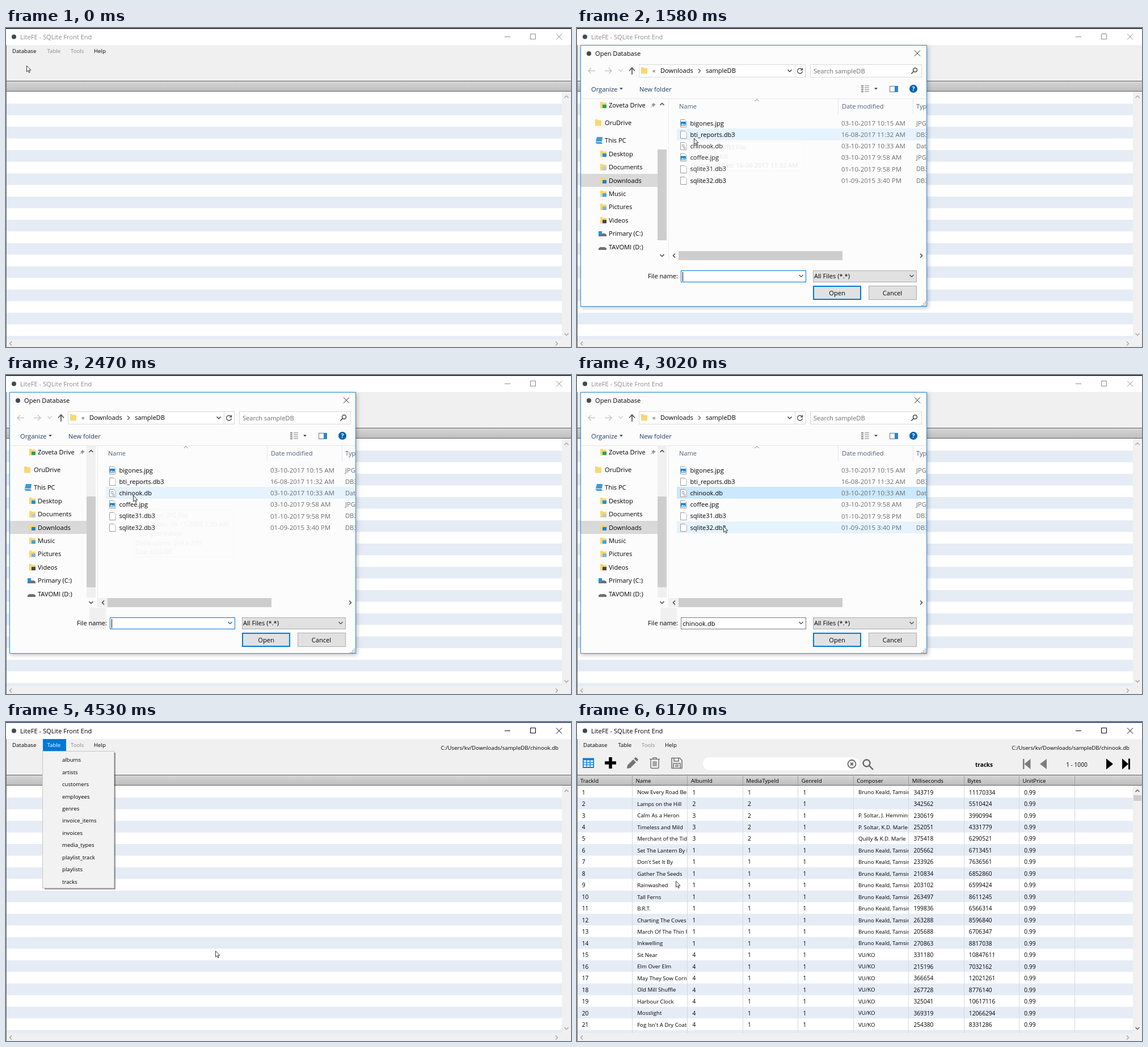
An HTML page with a canvas that plays this animation: 996 by 562 pixels, repeating every 8000 ms.

```html
<!DOCTYPE html>
<html lang="en">
<head>
<meta charset="utf-8">
<title>SQLite front end demo</title>
<style>
html, body { margin: 0; width: 100%; height: 100%; overflow: hidden; background: #fff; }
canvas { display: block; }
</style>
</head>
<body>
<canvas id="stage" width="996" height="562"></canvas>
<script>
const ctx = document.getElementById('stage').getContext('2d');
const LOOP = 8000, APP = 9.65, DLG = 11.1, NUM = 10.2, DATE = 11.5;
const BLUE = '#0078d7', GRAY = '#8a8a8a', THUMB = '#cdcdcd', FACE = '#f0f0f0';
const ROW = 20.47, COLUMN = 97.45;

// time, x, y of the pointer tip
const POINTER = [
  [0, 36, 66], [880, 60, 76], [1010, 97, 87], [1150, 173, 109], [1310, 151, 129], [1430, 186, 170],
  [1580, 206, 194], [1850, 220, 214], [1970, 225, 219], [2470, 224, 212], [2740, 238, 228],
  [2870, 250, 250], [3020, 258, 266], [3140, 286, 292], [3290, 380, 400], [3420, 436, 469],
  [3570, 437, 471], [4260, 438, 472], [4400, 404, 437], [4530, 369, 403], [4680, 316, 371],
  [4830, 278, 348], [4970, 232, 318], [5120, 197, 296], [5240, 177, 281], [5390, 174, 280]
];
const FILES = [
  ['bigones.jpg', '03-10-2017 10:15 AM', 'JPG File'], ['bti_reports.db3', '16-08-2017 11:32 AM', 'DB3 File'],
  ['chinook.db', '03-10-2017 10:33 AM', 'Data Base'], ['coffee.jpg', '03-10-2017 9:58 AM', 'JPG File'],
  ['sqlite31.db3', '01-10-2017 9:58 PM', 'DB3 File'], ['sqlite32.db3', '01-09-2015 3:40 PM', 'DB3 File']
];
const TABLES = 'albums artists customers employees genres invoice_items invoices media_types playlist_track playlists tracks'.split(' ');
const COLUMNS = 'TrackId Name AlbumId MediaTypeId GenreId Composer Milliseconds Bytes UnitPrice'.split(' ');
const TRACKS = `Now Every Road Bends|343719|11170334
Lamps on the Hill|342562|5510424
Calm As a Heron|230619|3990994
Timeless and Mild|252051|4331779
Merchant of the Tides|375418|6290521
Set The Lantern By It|205662|6713451
Don't Set It By|233926|7636561
Gather The Seeds|210834|6852860
Rainwashed|203102|6599424
Tall Ferns|263497|8611245
B.R.T.|199836|6566314
Charting The Coves|263288|8596840
March Of The Thin Reeds|205688|6706347
Inkwelling|270863|8817038
Sit Near|331180|10847611
Elm Over Elm|215196|7032162
May They Sow Corn|366654|12021261
Old Mill Shuffle|267728|8776140
Harbour Clock|325041|10617116
Mosslight|369319|12066294
Fog Isn't A Dry Coat|254380|8331286`.split('\n').map(row => row.split('|'));
const GUESTS = ['', 'P. Soltar, J. Hemmins', 'P. Soltar, K.D. Marle-Voss', 'Quilly & K.D. Marle'];

const within = (t, from, to) => t >= from && t < to;

function rect(x, y, w, h, fill, border, width = 1) {
  ctx.fillStyle = fill;
  ctx.fillRect(x, y, w, h);
  if (!border) return;
  ctx.strokeStyle = border;
  ctx.lineWidth = width;
  ctx.strokeRect(x + width / 2, y + width / 2, w - width, h - width);
}
function text(s, x, y, size = DLG, color = '#000', align = 'left', weight = 400) {
  ctx.font = `${weight} ${size}px "Open Sans", "Noto Sans", sans-serif`;
  ctx.fillStyle = color;
  ctx.textAlign = align;
  ctx.fillText(s, x, Math.round(y + size * 0.35));
}
function fill(d, color, x = 0, y = 0) {
  ctx.save();
  ctx.translate(x, y);
  ctx.fillStyle = color;
  ctx.fill(new Path2D(d));
  ctx.restore();
}
function stroke(d, color, width = 1, x = 0, y = 0) {
  ctx.save();
  ctx.translate(x, y);
  ctx.strokeStyle = color;
  ctx.lineWidth = width;
  ctx.stroke(new Path2D(d));
  ctx.restore();
}
function disc(x, y, r, color) {
  ctx.fillStyle = color;
  ctx.beginPath();
  ctx.arc(x, y, r, 0, 7);
  ctx.fill();
}
const CHEVRONS = { up: 'M-3.5 2 0-1.5 3.5 2', down: 'M-3.5-2 0 1.5 3.5-2', left: 'M2-3.5-1.5 0 2 3.5', right: 'M-2-3.5 1.5 0-2 3.5' };
const chevron = (dir, x, y, color = '#444', width = 1.5) => stroke(CHEVRONS[dir], color, width, x, y);
const cross = (x, y, color) => stroke('M-5-5 5 5M5-5-5 5', color, 1, x, y);
const magnifier = (x, y, r, color, width) =>
  stroke(`M${r} 0A${r} ${r} 0 1 1 ${-r} 0A${r} ${r} 0 1 1 ${r} 0M${r * .7} ${r * .7}L${r * 1.9} ${r * 1.9}`, color, width, x, y);

function clipped(x, y, w, h, paint) {
  ctx.save();
  ctx.beginPath();
  ctx.rect(x, y, w, h);
  ctx.clip();
  paint();
  ctx.restore();
}

function drawWindow(t) {
  const active = t >= 4110, loaded = t >= 6170;
  const ink = active ? '#000' : GRAY;
  rect(0, 0, 996, 562, '#fff');
  rect(0, 30, 996, 64, FACE);
  disc(14, 15.5, 4, '#3d4b57');
  text('LiteFE - SQLite Front End', 25, 16, DLG, ink);
  stroke('M879 15.5h10', ink);
  stroke('M924.5 10.5h9v9h-9z', ink);
  cross(975, 15.5, ink);

  const open = within(t, 4110, 5640);
  if (open) rect(65, 30, 41, 21.5, BLUE);
  text('Database', 11, 41, APP);
  text('Table', 72.5, 41, APP, open ? '#fff' : ink);
  text('Tools', 114, 41, APP, GRAY);
  text('Help', 155, 41, APP);
  if (active) text('C:/Users/kv/Downloads/sampleDB/chinook.db', 974, 46, APP, '#000', 'right');
  if (loaded) drawToolbar();

  const shade = ctx.createLinearGradient(0, 94, 0, 111);
  shade.addColorStop(0, '#d6d6d6');
  shade.addColorStop(1, '#bebebe');
  rect(0, 93, 996, 19, shade);
  rect(0, 93, 996, 1, '#606060');
  rect(0, 111, 996, 1, '#606060');
  for (let y = 133.2; y < 548; y += 2 * ROW) rect(1, y, 979, ROW, '#e6ecf6');
  if (t >= 5760) drawGrid(loaded);

  rect(980, 112, 16, 436, FACE);
  rect(0, 548, 996, 14, FACE);
  if (loaded) rect(981, 129, 14, 10, THUMB);
  const arrow = loaded ? '#505050' : '#a0a0a0';
  chevron('up', 988, 121, arrow, 1.2);
  chevron('down', 988, 540, arrow, 1.2);
  chevron('left', 8, 556, '#a0a0a0', 1.2);
  chevron('right', 971, 556, '#a0a0a0', 1.2);
  rect(0, 30, 1, 532, '#707070');
  rect(0, 0, 996, 1.4, active ? '#17365d' : '#000');
}

function drawToolbar() {
  rect(10, 63.5, 20, 17.5, '#0f7fd6');
  for (let i = 0; i < 9; i++) rect(11.7 + i % 3 * 6, 67.5 + Math.floor(i / 3) * 4.3, 4.6, 2.9, '#fff');
  stroke('M49 72h20M59 62v20', '#000', 5.5);
  fill('M88 82l1-6 10-10 5 5-10 10zM100.500 64.500l2-2q1-1 2 0l3 3q1 1 0 2l-2 2z', '#757575');
  stroke('M128 65.500h18M134 65v-2h6v2M130 66v13.500q0 2 2 2h10q2 0 2-2v-13.500M134.500 69v9M137 69v9M139.500 69v9', '#757575', 1.5);
  stroke('M167 63.500h14l4 4v14h-18zM171 64v5h8v-5M170 81v-8h12v8M173 76h6M173 78.500h6', '#757575', 1.6);
  ctx.beginPath();
  ctx.roundRect(222, 62, 275, 23, 11.5);
  ctx.fillStyle = '#fff';
  ctx.fill();
  stroke('M491.500 74a7 7 0 1 1-14 0a7 7 0 1 1 14 0M482 71.500l5 5M487 71.500l-5 5', '#666', 1.8);
  magnifier(510.5, 72.5, 6, '#666', 2.4);
  text('tracks', 702, 75, 10, '#000', 'left', 700);
  fill('M786 65h2.500v18h-2.500zM799.500 65v18l-11-9zM828 65v18l-12-9z', '#7d7d7d');
  text('1 - 1000', 881, 75, NUM, '#000', 'center');
  fill('M933 64.500v19l12-9.500zM961 64.500v19l11-9.500zM972 64.500h3v19h-3z', '#000');
}

function composer(i) {
  return i === 0 || (i > 4 && i < 14) ? 'Bruno Keald, Tamsin Ore' : i < 5 ? GUESTS[i - 1] : 'VU/KO';
}

function drawGrid(withData) {
  COLUMNS.forEach((name, c) => {
    const x = c * COLUMN, right = Math.floor(x + COLUMN);
    text(name, x + 6, 104, APP);
    rect(right, 95, 1, 16, '#a0a0a0');
    rect(right, 112, 1, 436, '#d5d9e0');
    if (!withData) return;
    clipped(x, 112, right - x, 436, () => TRACKS.forEach(([title, ms, bytes], i) => {
      const album = i === 1 ? 2 : i > 1 && i < 5 ? 3 : i > 13 ? 4 : 1;
      const media = i > 0 && i < 5 ? 2 : 1;
      const cell = [i + 1, title, album, media, 1, composer(i), ms, bytes, '0.99'][c];
      text(cell, x + 8.7, 124 + i * ROW, c === 1 || c === 5 ? APP : NUM);
    }));
  });
}

function drawTableMenu(t) {
  rect(68, 54, 125, 241, 'rgba(0,0,0,.4)');
  rect(64, 51, 127, 242, '#f2f2f2', '#c8c8c8');
  if (t >= 5240) rect(67, 270, 121, 21, '#91c9f7');
  TABLES.forEach((name, i) => text(name, 99, 67 + i * 21.42, APP));
}

function folder(x, y, badge) {
  fill('M0-6h4l1 1.500h6v10h-11z', '#f8d775', x, y);
  if (badge) rect(x + 4, y - 1, 7, 6, badge);
}

function drawSidebar(t) {
  rect(7, 257, 135, 23, '#d9d9d9');
  folder(41, 136);
  rect(45, 135, 7, 6, '#2f9e62');
  text('Zoveta Drive', 56, 136);
  fill('M0-4 4 0 2 0 0 2 0 4-2 1-5 4-5 3-2 0-4-2-2-2z', '#8b98a5', 135, 136);
  folder(32, 167);
  text('OruDrive', 49, 167);
  fill('M3-6h10l-1 8h-11zM0 3h11l2 3h-10z', '#3d9bd9', 32, 198);
  text('This PC', 49, 198);
  const places = { Desktop: '#2590d8', Documents: '#b9cbd8', Downloads: '#1d7fd0', Music: '#39a7e8', Pictures: '#7db4d8', Videos: '#45474d' };
  Object.entries(places).forEach(([name, badge], i) => {
    const y = 222 + i * 23.4;
    folder(41, y, badge);
    text(name, 56, y);
  });
  for (const y of [364, 388]) fill('M0 0l3-2h8l3 2v3h-14z', '#6d7074', 38, y);
  rect(38, 358, 6, 6, '#1f93e0');
  text('Primary (C:)', 56, 362.5);
  text('TAVOMI (D:)', 56, 386);
  if (t >= 1730) rect(142, 125, 16, 267, FACE);
  rect(142, 214, 16, 160, THUMB);
  chevron('up', 150, 134);
  chevron('down', 150, 401);
  rect(161, 125, 1, 284, '#ececec');
}

function drawFiles(t, px, py) {
  const heading = '#4c607a';
  text('Name', 180, 138, DLG, heading);
  text('Date modified', 467, 138, DLG, heading);
  for (const x of [460, 592]) rect(x, 125, 1, 27, '#e5e5e5');
  chevron('up', 317, 127, '#777', 1);
  const hovered = px >= 177 ? Math.floor((py - 158) / 20.15) : -1;
  clipped(162, 125, 454, 268, () => {
    text('Type', 598, 138, DLG, heading);
    FILES.forEach(([name, date, type], i) => {
      const y = 168 + i * 20.15;
      const selected = i === 2 && t >= 2590;
      const back = selected ? (t >= 3710 ? '#d9d9d9' : '#cce8ff') : i === hovered && '#e5f3ff';
      if (back) rect(176, Math.round(y - 11), 440, 21, back);
      stroke('M.500-6.500h7.500l3 3v10h-10.500z', '#9a9a9a', 1, 182, Math.round(y));
      fill('M1-6h7l2.500 2.500v9.500h-9.500z', '#fff', 182, Math.round(y));
      if (type[0] === 'J') {
        rect(183, y - 3, 9, 7, '#1b87d6');
        fill('M0 3l3-3 2 2 2-1 2 2z', '#d8ecf8', 183, y);
      } else if (i === 2) {
        stroke('M3-1a2 2 0 1 0 4 0a2 2 0 1 0-4 0M6 3a1.500 1.500 0 1 0 3 0a1.500 1.500 0 1 0-3 0', '#8c9299', 1, 182, y);
      }
      text(name, 199.5, y);
      text(date, 466, y, DATE, '#6d6d6d');
      text(type, 598, y, DLG, '#6d6d6d');
    });
  });
  if (t >= 2470) rect(162, 393, 17, 16, FACE);
  chevron('left', 171, 401);
  rect(179, 393, 289, 16, THUMB);
  chevron('right', 607, 401);
}

function tooltip(x, y, w, h, lines, alpha = 1) {
  ctx.globalAlpha = alpha;
  rect(x, y, w, h, '#fff', '#c4c4c4');
  lines.forEach((s, i) => text(s, x + 4, y + 10 + i * 16.3, DLG, '#575757'));
  ctx.globalAlpha = 1;
}

function drawDialog(t, px, py) {
  ctx.save();
  ctx.shadowColor = 'rgba(0,0,0,.25)';
  ctx.shadowBlur = 7;
  ctx.shadowOffsetX = ctx.shadowOffsetY = 2;
  rect(6, 30, 611, 461, '#fcfcfc');
  ctx.restore();
  rect(6, 30, 611, 461, '#fcfcfc', '#2d8ad1');
  disc(21, 45, 4, '#3d4b57');
  text('Open Database', 32, 45);
  cross(600, 44.5, '#222');

  stroke('M32 75.500h-12m5-5l-5 5 5 5M49 75.500h12m-5-5l5 5-5 5', '#c6c6c6', 1.4);
  chevron('down', 77, 75, '#c6c6c6', 1.2);
  stroke('M97 82v-12m-5 5.500l5-5.500 5 5.500', '#555', 1.7);
  rect(109, 64, 294, 23, '#fff', '#d9d9d9');
  rect(384, 65, 1, 21, '#d9d9d9');
  folder(113, 75);
  text('«', 133, 75, DLG, '#444');
  text('Downloads', 147, 75);
  chevron('right', 216, 75.5, '#555', 1.3);
  text('sampleDB', 227, 75);
  chevron('down', 375, 75.5);
  stroke('M4-2a4.500 4.500 0 1 0 .500 3M4.500-5v3.500h-3.500', '#555', 1.4, 393, 75.5);
  rect(411, 64, 197, 23, '#fff', '#d9d9d9');
  text('Search sampleDB', 417, 76, DLG, '#6d6d6d');
  ctx.save();
  ctx.translate(596, 74);
  ctx.scale(-1, 1);
  magnifier(0, 0, 3.5, '#444', 1.5);
  ctx.restore();

  text('Organize', 25, 108, DLG, '#1e395b');
  text('New folder', 110, 108, DLG, '#1e395b');
  for (const x of [78, 527]) fill('M-3-1.500h6l-3 3z', '#333', x, 107);
  for (let i = 0; i < 4; i++) {
    rect(501, 101 + i * 3.4, 4, 2, '#888');
    rect(507, 101 + i * 3.4, 8, 1.5, '#aaa');
  }
  rect(551, 102, 15, 11, '#fff', '#5b7896');
  rect(560, 102, 5, 10, '#2587d5');
  disc(593, 107, 7, '#0063b1');
  text('?', 593, 107, 10.5, '#fff', 'center', 700);
  rect(7, 124, 609, 1, '#e8e8e8');
  drawSidebar(t);
  drawFiles(t, px, py);
  drawFooter(t, px, py);

  if (within(t, 740, 880)) tooltip(35, 82, 125, 20, ['Back (Alt + Left Arrow)']);
  if (within(t, 1580, 1970)) {
    tooltip(197, 200, 201, 52, ['Item type: DB3 File', 'Size: 48.0 KB', 'Date modified: 16-08-2017 11:32 AM'],
      t < 1730 ? 0.13 : t < 1850 ? 1 : 0.3);
  }
  if (within(t, 2350, 2590)) {
    tooltip(224, 237, 177, 84, ['Item type: JPG File', 'Date taken: 04-11-2005 1:09 AM', 'Rating: Unrated',
      'Dimensions: 264 x 275', 'Size: 60.0 KB'], t < 2470 ? 1 : 0.07);
  }
}

function drawFooter(t, px, py) {
  const picked = t >= 2740;
  if (t >= 2470) rect(147, 410, 29, 38, FACE);
  if (t >= 3290) rect(176, 448, 325, 35, FACE);
  text('File name:', 178, 437, DLG, '#000', 'right');
  rect(183, 427, 221, 21, '#fff', picked ? '#7a7a7a' : BLUE);
  chevron('down', 395, 437, '#444', 1.2);
  if (picked) text('chinook.db', 186, 438);
  else if (t < 930 || within(t, 1430, 1970) || t >= 2470) rect(186, 430, 1, 16, '#000');
  rect(416, 427, 183, 21, '#e1e1e1', '#adadad');
  text('All Files (*.*)', 418, 437);
  chevron('down', 590, 437, '#444', 1.2);

  const pressed = t >= 3710, over = px >= 417 && within(py, 454, 478);
  rect(416, 454, 85, 25, pressed ? '#cce4f7' : over ? '#e5f1fb' : '#e1e1e1', pressed ? '#2c75b3' : BLUE, pressed ? 1 : 2);
  text('Open', 458.5, 467, DLG, '#000', 'center');
  rect(514, 454, 85, 25, '#e1e1e1', '#adadad');
  text('Cancel', 556, 467, DLG, '#000', 'center');
  for (let i = 0; i < 3; i++) for (let j = 0; j <= i; j++) rect(613 - j * 3, 482 + i * 3, 2, 2, '#b0b0b0');
}

function drawPointer(x, y) {
  const arrow = 'M.500.500v10.500l2.400-2.200 1.700 3.800 1.700-.700-1.700-3.700h3.300z';
  fill(arrow, '#fff', x, y);
  stroke(arrow, '#222', 0.9, x, y);
}

function draw(t) {
  const [, x, y] = POINTER.findLast(([time]) => t >= time);
  drawWindow(t);
  if (within(t, 300, 3980)) drawDialog(t, x, y);
  if (within(t, 4110, 5640)) drawTableMenu(t);
  drawPointer(x, y);
}

const start = performance.now();
function frame() {
  draw((performance.now() - start) % LOOP);
  requestAnimationFrame(frame);
}
frame();
</script>
</body>
</html>
```
